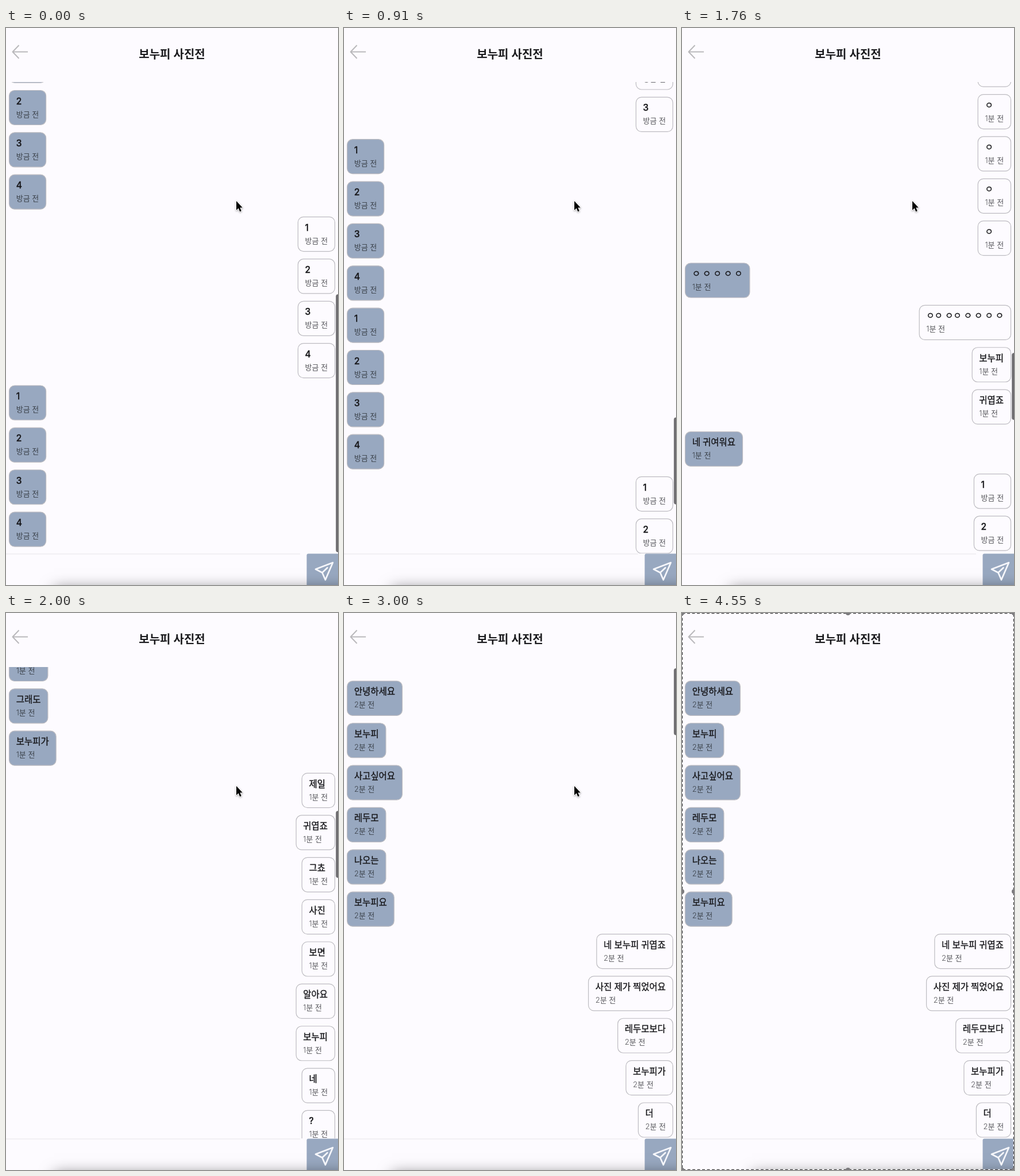
Recreate the animation shown at these times as an HTML page with a canvas. Size 578 by 969 pixels, loop 4.61 s.

```html
<!DOCTYPE html>
<html lang="ko">
<head>
<meta charset="utf-8">
<title>Chat scroll</title>
<style>
  html, body { margin: 0; width: 100%; height: 100%; overflow: hidden; background: #fdfbff; }
  canvas { display: block; width: 578px; height: 969px; }
</style>
</head>
<body>
<canvas id="stage"></canvas>
<script>
const W = 578, H = 969, LOOP = 4610, STEP = 30;
const TOP = 94, BOTTOM = 914;          // message viewport
const PITCH = 73.36, BOX_H = 61, LAST_Y = 841.6;
const PAPER = '#fdfbff', BLUE = '#98a8c0', BORDER = '#bdbcc1';
const FAMILY = 'Inter, "Noto Sans CJK KR", "Noto Sans CJK", sans-serif';
const MSG_FONT = `500 15.5px ${FAMILY}`;
const AGO_FONT = `300 13px ${FAMILY}`;

const canvas = document.getElementById('stage');
const ctx = canvas.getContext('2d');
const dpr = window.devicePixelRatio || 1;
canvas.width = W * dpr;
canvas.height = H * dpr;

// Conversation, oldest first: L = received, R = sent
const script = [
  'L:안녕하세요,보누피,사고싶어요,레두모,나오는,보누피요',
  'R:네 보누피 귀엽죠,사진 제가 찍었어요,레두모보다,보누피가,더,귀여워요',
  'L:ㄴ,네,훨씬,귀엽죠,저도 알아요',
  'R:레두모,주메노,보누피,다,귀여운데',
  'L:네,맞아요,그래도,보누피가',
  'R:제일,귀엽죠,그쵸,사진,보면,알아요,보누피,네,?',
  'L:네 귀여워요,ㅇㅇ,ㅇ,ㅇ,ㅇ,ㅇ,ㅇ,ㅇ,ㅇ',
  'R:ㅇ,ㅇ,ㅇ,ㅇ,ㅇ',
  'L:ㅇ ㅇ ㅇ ㅇ ㅇ',
  'R:ㅇㅇ ㅇㅇ ㅇ ㅇ ㅇ ㅇ,보누피,귀엽죠',
  'L:네 귀여워요',
  'R:1,2,3,4',
  'L:네',
  'R:1,2,3',
  'L:1,2,3,4,1,2,3,4',
  'R:1,2,3,4',
  'L:1,2,3,4'
];
const rows = script.flatMap(line =>
  line.slice(2).split(',').map(text => ({ text, sent: line[0] === 'R' })));
rows.forEach((row, i) => {
  row.ago = i < 16 ? '2분 전' : i < 54 ? '1분 전' : '방금 전';
});

// Each phase: start time, rows loaded, and [time, distance from bottom, speed] knots
const phases = [
  { from: 1580, loaded: 78, knots: [[1580, 0, 10.2], [1760, 1621, 8], [2270, 4275, 3.2], [2550, 4925, 0.6]] },
  { from: 760, loaded: 60, knots: [[760, 0, 2.8], [910, 452, 3.3], [1450, 2494, 5], [1570, 3604, 9]] },
  { from: -20, loaded: 20, knots: [[520, 0, 0], [740, 670, 4]] }
];

function hermite(knots, t) {
  if (t <= knots[0][0]) return knots[0][1];
  for (let i = 1; i < knots.length; i++) {
    const [t0, a, va] = knots[i - 1], [t1, b, vb] = knots[i];
    if (t > t1) continue;
    const h = t1 - t0, u = (t - t0) / h, u2 = u * u, u3 = u2 * u;
    return a * (2 * u3 - 3 * u2 + 1) + b * (3 * u2 - 2 * u3)
      + h * va * (u3 - 2 * u2 + u) + h * vb * (u3 - u2);
  }
  return knots[knots.length - 1][1];
}

// An extra hairline gives the text a medium weight
function label(text, x, y, font, color, hairline = 0) {
  ctx.font = font;
  ctx.fillStyle = color;
  ctx.fillText(text, x, y);
  if (!hairline) return;
  ctx.strokeStyle = color;
  ctx.lineWidth = hairline;
  ctx.strokeText(text, x, y);
}

function textWidth(text, font) {
  ctx.font = font;
  return ctx.measureText(text).width;
}

function roundBox(x, y, w, h, r) {
  ctx.beginPath();
  ctx.roundRect(x, y, w, h, r);
}

function polyline(points, close) {
  ctx.beginPath();
  points.forEach(([x, y]) => ctx.lineTo(x, y));
  if (close) ctx.closePath();
}

function drawRow(row, y) {
  const inner = Math.max(textWidth(row.text, MSG_FONT), textWidth(row.ago, AGO_FONT));
  const w = inner + 25.6;
  const x = row.sent ? 573 - w : 5;
  roundBox(x + 0.5, y + 0.5, w - 1, BOX_H - 1, 9.5);
  ctx.fillStyle = row.sent ? PAPER : BLUE;
  ctx.fill();
  ctx.strokeStyle = BORDER;
  ctx.lineWidth = 1.2;
  ctx.stroke();
  label(row.text, x + 12.7, y + 24.5, MSG_FONT, '#17171a', 0.35);
  label(row.ago, x + 12.7, y + 46.5, AGO_FONT, row.sent ? '#55555a' : '#3a4049');
}

function drawMessages(loaded, dist) {
  ctx.save();
  ctx.beginPath();
  ctx.rect(0, TOP, W, BOTTOM - TOP);
  ctx.clip();
  const last = rows.length - 1;
  for (let i = rows.length - loaded; i <= last; i++) {
    const y = LAST_Y - (last - i) * PITCH + dist;
    if (y > TOP - BOX_H && y < BOTTOM) drawRow(rows[i], y);
  }
  ctx.restore();
}

function drawThumb(loaded, dist, alpha) {
  if (alpha <= 0) return;
  const content = 24 + loaded * PITCH, track = 816;
  const len = track * (BOTTOM - TOP) / content;
  ctx.globalAlpha = alpha;
  ctx.fillStyle = '#6c6b6e';
  roundBox(574.3, 912 - len - track * dist / content, 8, len, 4);
  ctx.fill();
  ctx.globalAlpha = 1;
}

function drawHeader() {
  ctx.strokeStyle = '#bab9bc';
  ctx.lineWidth = 2;
  polyline([[22.5, 30], [11.5, 41.5], [22.5, 53]]);
  ctx.moveTo(11.5, 41.5);
  ctx.lineTo(38, 41.5);
  ctx.stroke();
  ctx.textAlign = 'center';
  label('보누피 사진전', 289, 52.5, `600 20px ${FAMILY}`, '#1b1b1e');
  ctx.textAlign = 'left';
}

function drawFooter(overlay) {
  ctx.fillStyle = '#e7e6ea';
  ctx.fillRect(0, 914.5, 512, 1);
  ctx.fillStyle = BLUE;
  roundBox(523.5, 914.5, 60, 60, 3);
  ctx.fill();

  ctx.save();
  ctx.shadowColor = 'rgba(0,0,0,.5)';
  ctx.shadowBlur = 24 * dpr;
  ctx.fillStyle = '#000';
  ctx.fillRect(overlay ? 122 : 84, 975, 800, 80);
  ctx.restore();

  ctx.strokeStyle = '#f6f7fb';
  ctx.lineWidth = 2.7;
  ctx.lineJoin = 'round';
  ctx.lineCap = 'round';
  polyline([[569, 930], [539, 941.5], [550.5, 947.5], [556, 960]], true);
  ctx.moveTo(550.5, 947.5);
  ctx.lineTo(559.5, 939);
  ctx.stroke();
  ctx.lineCap = 'butt';
}

function drawCursor() {
  ctx.save();
  ctx.lineJoin = 'round';
  polyline([[401, 301], [401, 317], [404.6, 313.6], [407.2, 319.4],
    [409.8, 318.3], [407.3, 312.6], [411.8, 312.4]], true);
  ctx.shadowColor = 'rgba(0,0,0,.35)';
  ctx.shadowBlur = 3 * dpr;
  ctx.shadowOffsetY = dpr;
  ctx.strokeStyle = '#fff';
  ctx.lineWidth = 2;
  ctx.stroke();
  ctx.shadowColor = 'transparent';
  ctx.fillStyle = '#000';
  ctx.fill();
  ctx.restore();
}

function drawSelection() {
  ctx.strokeStyle = '#fff';
  ctx.lineWidth = 1.4;
  ctx.strokeRect(0.5, 0.5, W - 1, H - 1);
  ctx.strokeStyle = '#444346';
  ctx.setLineDash([5, 3.5]);
  ctx.strokeRect(0.5, 0.5, W - 1, H - 1);
  ctx.setLineDash([]);
  ctx.fillStyle = '#7b7a7d';
  for (const x of [0, W / 2, W]) {
    for (const y of [0, H / 2, H]) {
      if (x === W / 2 && y === H / 2) continue;
      ctx.beginPath();
      ctx.arc(x, y, 4, 0, Math.PI * 2);
      ctx.fill();
    }
  }
}

function draw(now) {
  const { from, loaded, knots } = phases.find(p => now >= p.from);
  const t = from + Math.floor((now - from) / STEP) * STEP;
  const dist = hermite(knots, t);
  const overlay = t >= 3270;
  ctx.setTransform(dpr, 0, 0, dpr, 0, 0);
  ctx.fillStyle = PAPER;
  ctx.fillRect(0, 0, W, H);
  drawHeader();
  drawMessages(loaded, dist);
  drawFooter(overlay);
  drawThumb(loaded, dist, Math.min(1, (3280 - t) / 230));
  if (overlay) drawSelection();
  else drawCursor();
}

const start = performance.now();
function tick() {
  draw((performance.now() - start) % LOOP);
  requestAnimationFrame(tick);
}
tick();
</script>
</body>
</html>
```
